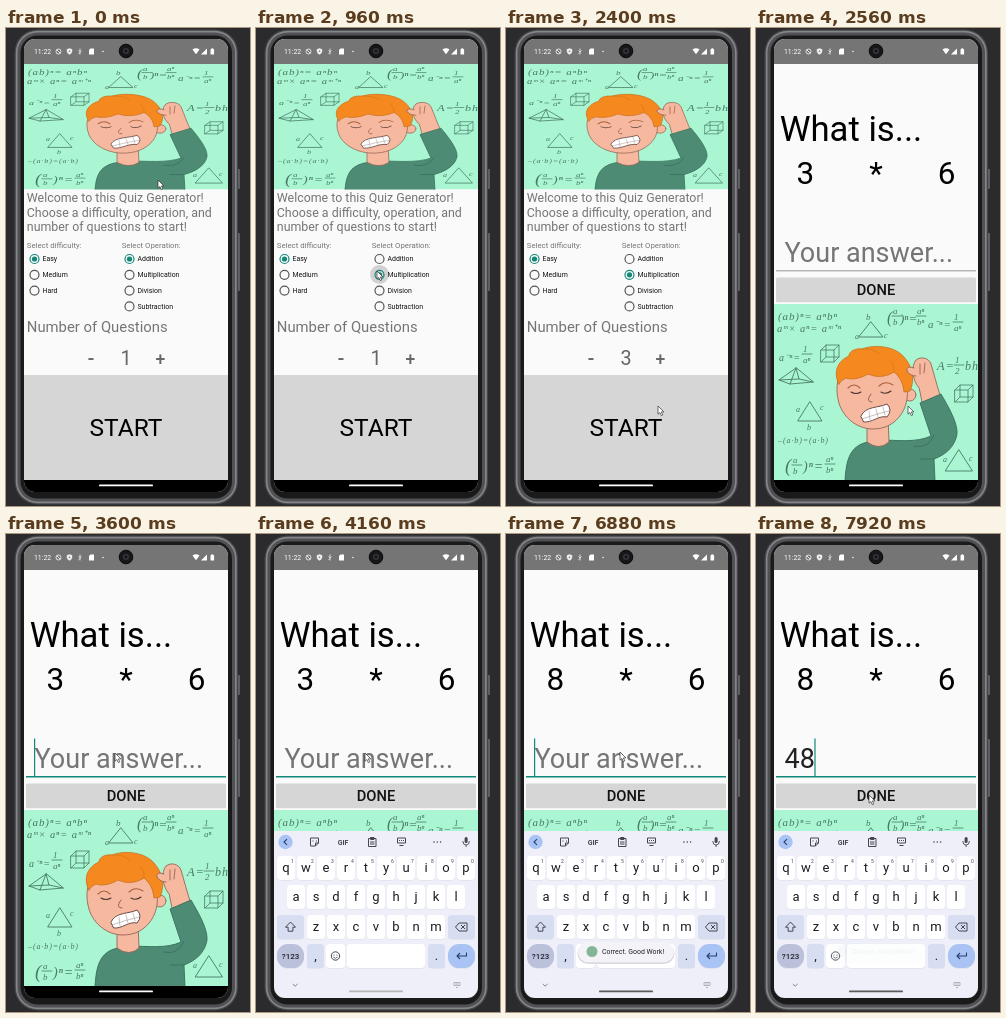
Write an HTML page with a canvas that moves like this. It is 244x478 px and loops after 8 s.

```html
<!DOCTYPE html>
<html lang="en">
<head>
<meta charset="utf-8">
<title>Quiz Generator</title>
<style>
html, body { margin: 0; width: 100%; height: 100%; overflow: hidden; background: #2b2b2d; }
canvas { display: block; }
</style>
</head>
<body>
<canvas id="stage" width="244" height="478"></canvas>
<script>
const ctx = document.getElementById('stage').getContext('2d');
const LOOP = 8000, STEP = 80;
const TEAL = '#138878', GREY = '#757575', BUTTON = '#d6d6d6', INK = '#487a67';

// ---------- helpers ----------
const clamp = v => Math.max(0, Math.min(1, v));
const ramp = (t, a, b) => clamp((t - a) / (b - a));
const smooth = v => v * v * (3 - 2 * v);
const during = (t, a, b) => t >= a && t < b;

function text(str, x, y, size, color, align = 'left', style = '400', family = 'Roboto, sans-serif') {
  ctx.font = `${style} ${size}px ${family}`;
  ctx.textAlign = align;
  ctx.fillStyle = color;
  ctx.fillText(str, x, y);
}
function rect(x, y, w, h, color, r = 0) {
  ctx.fillStyle = color;
  ctx.beginPath();
  ctx.roundRect(x, y, w, h, r);
  ctx.fill();
}
function circle(x, y, r, fill, stroke, width = 1) {
  ctx.beginPath();
  ctx.arc(x, y, r, 0, 7);
  paint(null, fill, stroke, width);
}
function paint(path, fill, stroke, width = 1) {
  const shape = path && new Path2D(path);
  if (fill) { ctx.fillStyle = fill; shape ? ctx.fill(shape) : ctx.fill(); }
  if (stroke) {
    ctx.strokeStyle = stroke;
    ctx.lineWidth = width;
    shape ? ctx.stroke(shape) : ctx.stroke();
  }
}
function at(x, y, draw) {
  ctx.save();
  ctx.translate(x, y);
  draw();
  ctx.restore();
}
function faded(alpha, draw) {
  ctx.save();
  ctx.globalAlpha = alpha;
  draw();
  ctx.restore();
}

// ---------- cartoon, 204 x 176 ----------
const formula = (str, x, y, size = 10.5) =>
  text(str, x, y, size, INK, 'left', 'italic 400', '"Liberation Serif", serif');
function fraction(top, bottom, x, y) {
  formula(top, x, y - 4, 9);
  formula(bottom, x, y + 7, 9);
  paint(`M${x - 1} ${y - 2}h10`, null, INK, 0.8);
}
const cube = (x, y) => at(x, y, () =>
  paint('M0 4h13v12h-13zM0 4l5-5h13v12l-5 5M13 4l5-5M5-1v12h13M5 11l-5 5', null, INK, 0.8));
const triangle = (x, y, w, h) =>
  paint(`M${x} ${y}l${w / 2} ${h}h${-w}z`, null, INK, 0.9);

function formulas() {
  ctx.letterSpacing = '0.9px';
  formula('(ab)ⁿ= aⁿbⁿ', 4, 16, 11);
  formula('aᵐ× aⁿ= aᵐ⁺ⁿ', 3, 28, 10.5);
  formula('a⁻ⁿ=', 154, 24, 11);
  formula('a⁻ⁿ=', 5, 57, 10);
  formula('A=', 163, 66, 12.5);
  formula('bh', 191, 66, 12);
  formula('–(a·b)=(a·b)', 4, 139, 8);
  formula('(', 11, 168, 19);
  formula(')ⁿ=', 29, 167, 14);
  ctx.letterSpacing = '0px';

  formula('(', 113, 19, 16); formula(')ⁿ=', 126, 19, 13);
  fraction('a', 'b', 119, 14); fraction('aⁿ', 'bⁿ', 143, 14);
  fraction('1', 'aⁿ', 180, 20); fraction('1', 'aⁿ', 29, 52);
  fraction('1', '2', 181, 63);
  fraction('a', 'b', 19, 163); fraction('aⁿ', 'bⁿ', 52, 162);

  triangle(97, 18, 24, 15);
  triangle(36, 98, 24, 19);
  triangle(185, 146, 27, 21);
  formula('b', 92, 16, 9); formula('a', 81, 35, 8); formula('c', 110, 34, 8);
  formula('a', 22, 108, 8); formula('c', 46, 106, 8); formula('b', 33, 126, 8);
  formula('a', 169, 158, 8); formula('c', 195, 157, 8);
  cube(47, 42);
  cube(181, 82);
  paint('M22 64l-17 12l11 4l23-2zM22 64l-6 16M22 64l3 11l-20 1M25 75l14 3', null, INK, 0.9);
}

function cartoon(y, height) {
  ctx.save();
  ctx.beginPath();
  ctx.rect(18, y, 204, height);
  ctx.clip();
  ctx.translate(18, y);
  ctx.scale(1, height / 176);
  ctx.lineJoin = ctx.lineCap = 'round';
  rect(0, 0, 204, 176, '#aaf6d2');
  formulas();

  const line = '#8a5a4c', skin = '#f6b9a0', shirt = '#4e8b74', shade = '#38705d';
  // raised arm, body and neck
  paint('M145 84C138 76 137 62 142 56C147 52 155 54 157 60C160 70 163 82 167 94L149 101Z', skin, line, 0.8);
  paint('M71 177C72 158 75 144 90 139L104 136C124 136 142 139 157 132L146 99L167 90C174 102 184 119 183 130C181 143 171 151 160 155L161 177Z', shirt, shade, 0.9);
  paint('M140 142C150 144 156 140 160 131M146 155L160 155', null, shade, 0.9);
  paint('M93 117L93 138Q105 147 115 138L114 112Z', skin, line, 0.8);
  // head
  circle(136, 91, 6, skin, line, 0.8);
  paint('M66 70C78 58 112 52 126 66C135 77 136 96 128 109C121 120 111 125 99 125C82 125 67 112 64 95C62 86 63 76 66 70Z', skin, line, 0.8);
  // hair
  paint('M65 80C59 69 63 57 75 52C75 47 82 44 88 45C100 40 121 42 130 53C139 63 141 76 136 87L130 88C129 79 126 73 120 68C112 73 103 74 94 70C86 75 77 76 72 74Q67 76 65 80Z', '#f5891f', '#c9701c', 0.8);
  paint('M88 45Q98 44 106 50M120 68Q121 61 116 56', null, '#d67a1c', 0.8);
  // face
  paint('M74 84Q80 78 86 84M105 82Q111 76 119 81', null, '#a8623c', 1.1);
  paint('M77 88Q82 91 87 88M107 88Q112 91 117 87', null, '#4a332c', 1.1);
  paint('M97 90Q91 98 98 98', null, line, 0.9);
  paint('M87 112C91 102 105 104 113 100Q119 106 113 113C105 111 98 119 90 118Z', '#fff', '#5e3d38', 0.9);
  paint('M88 115Q102 110 115 107M95 107L96 116M102 105L104 113M109 103L111 111', null, '#a79592', 0.6);
  // fingers
  paint('M140 64Q132 61 133 67Q136 72 142 72M146 60L146 70M151 59L150 69', skin, line, 0.8);
  ctx.restore();
}

// ---------- phone ----------
function phoneBody() {
  rect(0, 0, 244, 478, '#2b2b2d');
  rect(231, 141, 3, 20, '#5e5f62', 1);
  rect(231, 205, 3, 58, '#5e5f62', 1);
  const rings = [[0, '#454648'], [1.3, '#858689'], [3, '#505154'], [6, '#1a1a1b']];
  for (const [inset, color] of rings)
    rect(8.5 + inset, 1.5 + inset, 223.5 - 2 * inset, 475 - 2 * inset, color, 23 - inset);
}
function statusBar() {
  rect(18, 11, 204, 25, GREY);
  text('11:22', 28, 26, 6.9, '#fff');
  circle(52.5, 23.5, 2.5, null, '#eee', 0.9);
  paint('M50.7 21.7l3.6 3.6', null, '#eee', 0.9);
  paint('M63.5 20.3l2.7 1v2q0 2.2-2.7 3.4q-2.7-1.2-2.7-3.4v-2z', '#eee');
  circle(63.5, 23.2, 0.8, GREY);
  paint('M74 20.5v6M72.5 22.5l1.5 1.5l1.5-1.5M72.5 26l1.5-1.5', null, '#eee', 0.8);
  paint('M83 22l1.5-1.5h3.5v6h-5z', '#fff');
  circle(97, 23.5, 0.8, '#eee');
  paint('M186.5 21.5q3.5-2.5 7 0l-3.5 4.8z', '#fff');
  paint('M201 20.5v6h-6z', '#fff');
  rect(204.5, 21, 3.6, 5.6, '#fff', 0.7);
  rect(205.5, 20.2, 1.6, 1, '#fff');
  circle(120, 23, 6.8, '#171719', '#08080a', 1);
  circle(120, 23, 3, '#33363c');
  circle(120, 23, 1.4, '#111');
}
function navBar() {
  rect(18, 452, 204, 13, '#000');
  rect(93, 456.5, 54, 1.8, '#fff', 1);
}

// ---------- first screen ----------
function radio(label, x, y, on) {
  circle(x, y, 4.5, null, on ? TEAL : '#555', 1.2);
  if (on) circle(x, y, 2.6, TEAL);
  text(label, x + 8, y + 2.4, 6.94, '#111');
}
function setupScreen(t) {
  cartoon(36, 125.5);
  ['Welcome to this Quiz Generator!', 'Choose a difficulty, operation, and', 'number of questions to start!']
    .forEach((row, i) => text(row, 20.8, 174 + i * 14.6, 12.4, GREY));
  text('Select difficulty:', 20.8, 220, 7.8, GREY);
  text('Select Operation:', 115.7, 220, 7.8, GREY);

  const operation = t < 960 ? 0 : 1;
  if (during(t, 960, 1360))
    faded(0.16 * (1 - ramp(t, 1120, 1360)), () => circle(123.5, 246.5, 9.5, '#000'));
  ['Easy', 'Medium', 'Hard'].forEach((s, i) => radio(s, 28.5, 231 + i * 15.8, i === 0));
  ['Addition', 'Multiplication', 'Division', 'Subtraction']
    .forEach((s, i) => radio(s, 123.5, 231 + i * 15.8, i === operation));

  text('Number of Questions', 20.8, 304, 14.87, GREY);
  if (during(t, 1760, 2240))
    faded(1 - ramp(t, 2000, 2240), () => rect(135, 317, 39, 26, '#dedede', 1.5));
  const count = t < 1760 ? 1 : t < 1920 ? 2 : 3;
  text('-', 85, 336.5, 19.8, '#666', 'center', '500');
  text(count, 120, 337, 19.8, '#666', 'center');
  text('+', 154.5, 336.5, 17.5, '#666', 'center', '500');

  rect(18, 347, 204, 105, BUTTON);
  text('START', 120, 408.4, 24.5, '#000', 'center');
}

// ---------- question screen ----------
const typed = t => t < 4480 ? '' : t < 4640 ? '1' : t < 5600 ? '18' : t < 7280 ? '' : t < 7600 ? '4' : '48';
const caretTimes = [[3600, 4000], [4480, 5120], [5600, 6080], [6560, LOOP]];

function questionScreen(t) {
  text('What is...', 23.7, 112.7, 34.7, '#000');
  const term = (str, x) => text(str, x, 156, 31.5, '#000', 'center');
  term(t < 5600 ? 3 : 8, 49.3);
  term('*', 120);
  term(6, 190.6);

  const answer = typed(t);
  text(answer || 'Your answer...', 28.5, 233.8, 27, answer ? '#222' : GREY);
  if (t < 3600) rect(20, 242.5, 200, 0.8, '#777');
  else rect(20, 242, 200, 1.4, TEAL);
  if (caretTimes.some(([a, b]) => during(t, a, b)))
    rect(28 + answer.length * 15.2, 204.5, 1.2, 37.5, TEAL);

  rect(20, 249.5, 200, 24.8, BUTTON, 1.5);
  const press = ramp(t, 5440, 5600) * (1 - ramp(t, 5680, 6080));
  faded(press * 0.1, () => rect(20, 249.5, 200, 24.8, '#000', 1.5));
  text('DONE', 120, 266.8, 14.7, '#111', 'center', '500');

  cartoon(276, 176);
  navBar();
  if (t >= 3760) {
    const slide = 1 - (1 - ramp(t, 3680, 4000)) ** 2;
    at(0, 166 * (1 - slide), () => keyboard(t));
  }
  const toastAlpha = ramp(t, 5600, 6000) * (1 - ramp(t, 7600, 7940));
  if (toastAlpha) faded(toastAlpha, toast);
}

function key(label, x, y, w = 18, fill = '#fff', r = 3.5) {
  rect(x, y + 0.6, w, 24, '#d9dbe5', r);
  rect(x, y, w, 24, fill, r);
  text(label, x + w / 2, y + 16, 13, '#1b1b20', 'center');
}
function keyboard(t) {
  const dark = '#44464f', soft = '#d8def2';
  rect(18, 297, 204, 168, '#eeeff8');
  circle(29.5, 308, 7.2, '#a9c3f4');
  paint('M31 305.2l-3 2.8l3 2.8', null, '#24406e', 1.1);
  paint('M54.5 304h8v5l-3 3h-5zM62.5 309h-3v3M56.5 307h1M60 307h1', null, dark, 1);
  text('GIF', 87, 310.5, 7, dark, 'center', '700');
  paint('M112.5 304.5h7.5v8h-7.5zM114.5 303.5h3.5v2h-3.5zM114 308h4.5M114 310h4.5', null, dark, 1);
  paint('M141.5 304h8v5h-8zM143 306.5h1M145 306.5h1M147 306.5h1M143.5 311.5h4', null, dark, 1);
  [178, 181.3, 184.6].forEach(x => circle(x, 308, 0.8, dark));
  rect(208.6, 303, 3, 6, dark, 1.5);
  paint('M206.8 307q0 4 3.3 4t3.3-4M210.1 311v2', null, dark, 0.9);

  [...'qwertyuiop'].forEach((c, i) => {
    key(c, 21 + i * 20, 322);
    text((i + 1) % 10, 36.3 + i * 20, 329, 5, dark, 'center');
  });
  [...'asdfghjkl'].forEach((c, i) => key(c, 31 + i * 20, 351));
  [...'zxcvbnm'].forEach((c, i) => key(c, 51 + i * 20, 381));
  key('', 21, 381, 27, soft);
  paint('M34.5 388l5 5.2h-2.6v4h-4.8v-4h-2.6z', null, dark, 1);
  key('', 192, 381, 27, soft);
  paint('M199.5 393l3.5-4h8v8h-8zM205 391l4 4M209 391l-4 4', null, dark, 1);

  key('', 21, 410, 27, '#bbc1da', 11);
  text('?123', 34.5, 425, 8, '#1f2230', 'center', '500');
  key(',', 51, 410, 17, soft);
  key('', 70, 410, 19);
  circle(79.5, 422, 4.2, null, dark, 1);
  circle(78, 421, 0.6, dark);
  circle(81, 421, 0.6, dark);
  paint('M77.3 423q2.2 2.5 4.4 0', null, dark, 0.8);
  key('', 91, 410, 78);
  key('.', 172, 410, 17, soft);
  key('', 192, 410, 27, '#a9c3f4', 11);
  paint('M210.5 418.5v3.5h-9M204 419l-3 3l3 3', null, '#24406e', 1.1);

  paint('M36.8 450l2.4 2.2l2.4-2.2', null, '#777', 0.9);
  paint('M198 448.5h6v3h-6zM199.5 450h3M200 453l1 1l1-1', null, '#a3a4ab', 0.8);
  const shade = Math.round(205 - 115 * ramp(t, 4000, 4800));
  rect(93, 456.5, 54, 1.8, `rgb(${shade},${shade},${shade})`, 1);
}
function toast() {
  rect(71.5, 408.8, 97, 21, '#cfd1da', 10.5);
  rect(72, 408, 96, 20.5, '#f4f3f8', 10.2);
  circle(86, 417.5, 5.5, '#83b596');
  text('Correct. Good Work!', 96, 419.5, 6.94, '#222');
}

// ---------- pointer: [time, x, y] ----------
const pointerPath = [
  [80, 152, 152], [720, 121, 243], [1120, 121, 243], [1680, 158, 329], [2000, 158, 329],
  [2400, 152, 378], [2560, 152, 378], [3120, 109, 219], [4800, 109, 219], [5280, 113, 264],
  [5760, 113, 264], [6080, 116, 249], [6480, 116, 249], [6880, 114, 218], [7600, 114, 218],
  [7920, 113, 261], [LOOP, 113, 261]
];
function pointer(t) {
  const next = Math.max(1, pointerPath.findIndex(p => p[0] > t));
  const [a, x0, y0] = pointerPath[next - 1], [b, x1, y1] = pointerPath[next];
  const k = smooth(ramp(t, a, b));
  at(x0 + (x1 - x0) * k, y0 + (y1 - y0) * k, () =>
    paint('M0 0v8.2l1.9-1.7l1.4 3.1l1.5-.7l-1.4-3h2.5z', '#fff', '#333', 0.7));
}

function render(t) {
  phoneBody();
  ctx.save();
  ctx.beginPath();
  ctx.roundRect(18, 11, 204, 453, 11);
  ctx.clip();
  rect(18, 11, 204, 453, '#fafafa');
  if (t < 2560) { setupScreen(t); navBar(); }
  else questionScreen(t);
  statusBar();
  pointer(t);
  ctx.restore();
}
function tick() {
  const t = performance.now() % LOOP;
  render(Math.floor(t / STEP) * STEP);
  requestAnimationFrame(tick);
}
tick();
</script>
</body>
</html>
```
